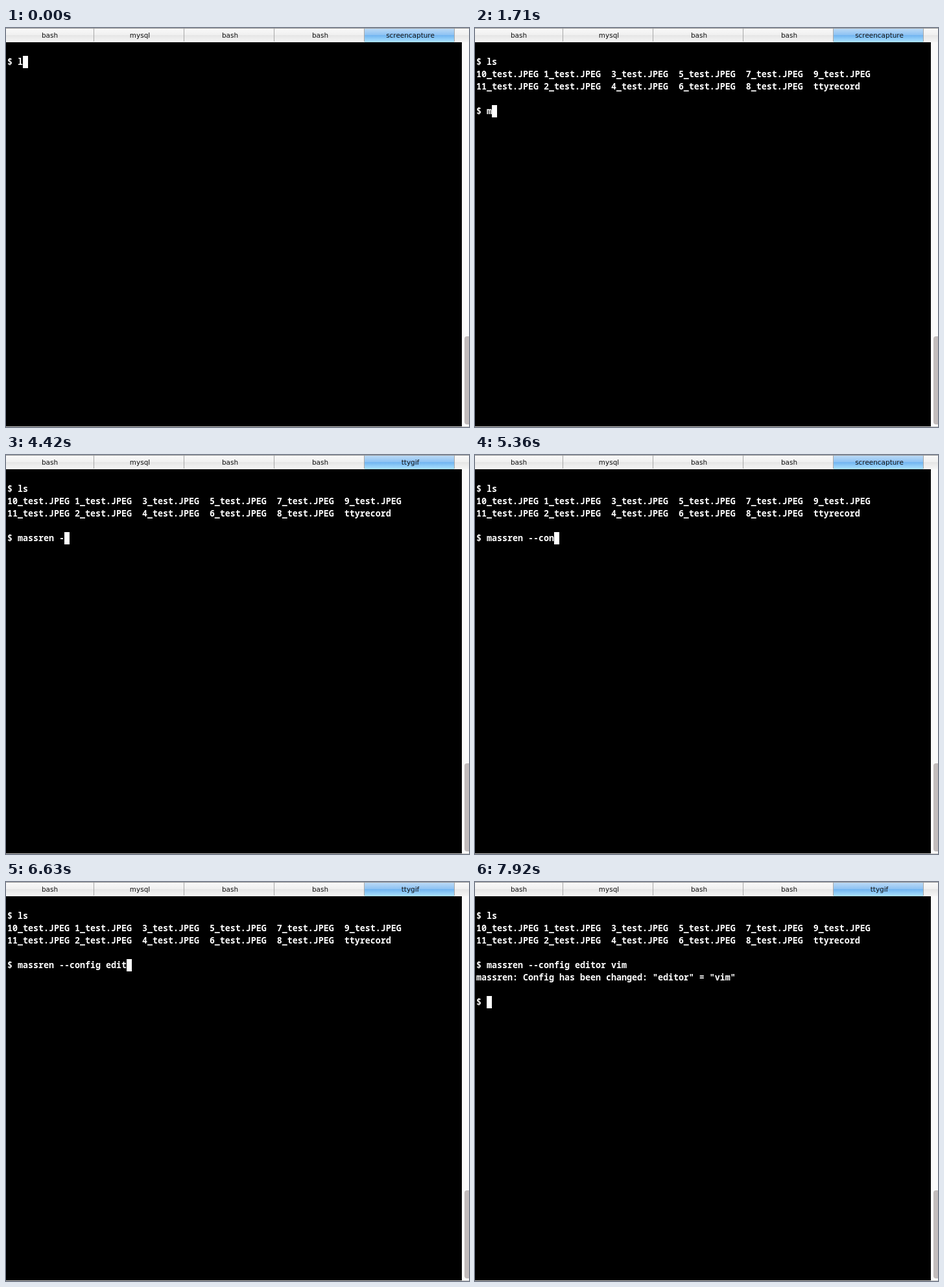
These frames come from a looping animation (714 by 616 pixels, 8 s). An HTML page:

```html
<!DOCTYPE html>
<html lang="en">
<head>
<meta charset="utf-8">
<title>Terminal session</title>
<style>
  html, body { margin: 0; width: 100%; height: 100%; overflow: hidden; background: #000; }
  svg { display: block; width: 714px; height: 616px; }
  .tabs text { font: 10.45px "DejaVu Sans", Verdana, sans-serif; text-anchor: middle; fill: #111; }
  .screen text { font: 600 13.3333px "Noto Sans Mono", "DejaVu Sans Mono", monospace; fill: #fff; white-space: pre; }
</style>
</head>
<body>
<svg viewBox="0 0 714 616" shape-rendering="crispEdges">
  <defs>
    <linearGradient id="plain" x2="0" y2="1">
      <stop offset="0" stop-color="#fafafa"/>
      <stop offset=".48" stop-color="#f0f0f0"/>
      <stop offset=".5" stop-color="#e5e5e5"/>
      <stop offset="1" stop-color="#f6f6f6"/>
    </linearGradient>
    <linearGradient id="active" x2="0" y2="1">
      <stop offset="0" stop-color="#c0dcf6"/>
      <stop offset=".48" stop-color="#8fc3f3"/>
      <stop offset=".5" stop-color="#6fb3f0"/>
      <stop offset="1" stop-color="#aee4ff"/>
    </linearGradient>
  </defs>

  <rect width="714" height="616" fill="#000"/>

  <g class="tabs">
    <rect width="714" height="22" fill="url(#plain)"/>
    <rect x="553" width="138" height="22" fill="url(#active)"/>
    <rect width="714" height="1" fill="#9a9a9a"/>
    <path d="M135.5 1V21M274.5 1V21M413.5 1V21M552.5 1V21M691.5 1V21" stroke="#a8a8a8"/>
    <text x="67.5" y="15">bash</text>
    <text x="206.5" y="15">mysql</text>
    <text x="345.5" y="15">bash</text>
    <text x="484.5" y="15">bash</text>
    <text x="623.5" y="15" id="title">screencapture</text>
  </g>

  <rect x="703" y="22" width="11" height="594" fill="#fafafa"/>
  <rect x="707" y="476" width="12" height="136" rx="4" fill="#c2bcbc" shape-rendering="auto"/>
  <rect y="615" width="714" height="1" fill="#c8c8c8"/>

  <g class="screen" id="screen">
    <rect id="cursor" width="8" height="19" fill="#fff"/>
  </g>
</svg>

<script>
const LOOP = 8000, LEFT = 2, TOP = 43, COL = 8, ROW = 19, BASE = 14, ROWS = 8;
const CAPTURE = "screencapture", TTY = "ttygif";

const listing =
  "10_test.JPEG 1_test.JPEG  3_test.JPEG  5_test.JPEG  7_test.JPEG  9_test.JPEG\n" +
  "11_test.JPEG 2_test.JPEG  4_test.JPEG  6_test.JPEG  8_test.JPEG  ttyrecord\n";
const message = 'massren: Config has been changed: "editor" = "vim"\n';

// [time, appended output, new tab title if it changes]
const events = [
  [0, "$ l", CAPTURE], [500, "s"], [1120, "\n", ""],
  [1510, listing, CAPTURE], [1610, "\n$ "],
  [1710, "m"], [3690, "a", TTY], [3810, "s"], [3840, "s"], [4010, "r"],
  [4170, "e"], [4250, "n", CAPTURE], [4340, " "], [4420, "-", TTY],
  [4910, "-"], [5040, "c"], [5240, "o"], [5360, "n", CAPTURE], [5420, "f"],
  [5530, "i"], [5620, "g"], [5730, " "],
  [5910, "e"], [6420, "d"], [6530, "i"], [6630, "t", TTY], [6730, "o"], [6820, "r"],
  [6930, " "], [7040, "v"], [7230, "i"], [7380, "m"], [7400, "\n", ""],
  [7820, message, TTY], [7920, "\n$ "]
];

const screen = document.getElementById("screen");
const cursor = document.getElementById("cursor");
const title = document.getElementById("title");

const rows = Array.from({ length: ROWS }, (_, i) => {
  const row = document.createElementNS("http://www.w3.org/2000/svg", "text");
  row.setAttribute("x", LEFT);
  row.setAttribute("y", TOP + ROW * i + BASE);
  return screen.appendChild(row);
});

function show(count) {
  let output = "", name = "";
  for (const [, text, tab] of events.slice(0, count)) {
    output += text;
    if (tab !== undefined) name = tab;
  }
  const lines = output.split("\n");
  rows.forEach((row, i) => { row.textContent = lines[i] || ""; });
  const last = lines.length - 1;
  cursor.setAttribute("x", LEFT + COL * lines[last].length);
  cursor.setAttribute("y", TOP + ROW * last);
  title.textContent = name;
}

let shown = 0, start = null;
function tick(now) {
  if (start === null) start = now;
  const time = Math.max(0, now - start) % LOOP;
  const count = events.filter(([at]) => at <= time).length;
  if (count !== shown) show(shown = count);
  requestAnimationFrame(tick);
}
show(shown = 1);
requestAnimationFrame(tick);
</script>
</body>
</html>
```
